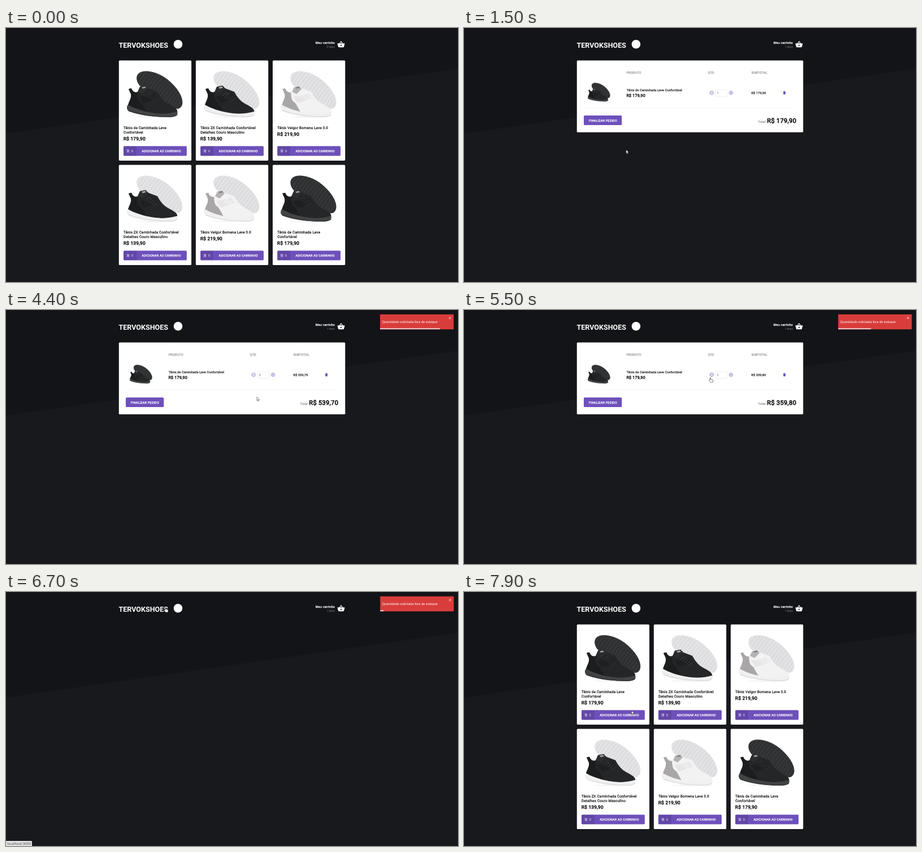
These frames come from a looping animation (800 by 450 pixels, 8 s). An HTML page:

```html
<!DOCTYPE html>
<html lang="pt-BR">
<head>
<meta charset="utf-8">
<title>Loja</title>
<style>
html, body { margin: 0; width: 100%; height: 100%; overflow: hidden; background: #18191d; }
svg { display: block; width: 100vw; height: 100vh; }
text { font-family: Roboto, sans-serif; text-rendering: geometricPrecision; white-space: pre; }
.strong { letter-spacing: .033em; stroke-width: .05em; }
.toast { font-family: "Liberation Sans", Arial, sans-serif; }
.tip { font-family: "Noto Sans", sans-serif; }
</style>
</head>
<body>
<svg id="stage" viewBox="0 0 800 450" preserveAspectRatio="none"></svg>
<script>
const LOOP = 8000;
const PURPLE = '#6e50bb', DARK_PURPLE = '#5f43a6';
const stage = document.getElementById('stage');
const $ = id => document.getElementById(id);

const icons = {
  basket: 'M17.21 9l-4.38-6.56c-.19-.28-.51-.42-.83-.42-.32 0-.64.14-.83.43L6.79 9H2c-.55 0-1 .45-1 1 0 .09.01.18.04.27l2.54 9.27c.23.84 1 1.46 1.92 1.46h13c.92 0 1.69-.62 1.93-1.46l2.54-9.27L23 10c0-.55-.45-1-1-1h-4.79zM9 9l3-4.4L15 9H9zm3 8c-1.1 0-2-.9-2-2s.9-2 2-2 2 .9 2 2-.9 2-2 2z',
  cart: 'M11 9h2V6h3V4h-3V1h-2v3H8v2h3zM7 18a2 2 0 1 0 .01 0zM17 18a2 2 0 1 0 .01 0zM7.2 14.6L8.1 13h7.4c.8 0 1.4-.4 1.8-1l3.9-7-1.8-1-3.9 7h-7L4.3 2H1v2h2l3.6 7.6-1.35 2.4C4.5 15.4 5.5 17 7 17h12v-2H7.4z',
  trash: 'M6 19c0 1.1.9 2 2 2h8c1.1 0 2-.9 2-2V7H6v12zM19 4h-3.5l-1-1h-5l-1 1H5v2h14V4z'
};

function text(x, y, size, str, fill, o = {}) {
  const strong = o.plain ? '' : ` stroke="${fill}"`;
  const cls = o.cls || (o.plain ? '' : 'strong');
  return `<text x="${x}" y="${y}" font-size="${size}" fill="${fill}"${strong} class="${cls}"` +
    ` text-anchor="${o.anchor || 'start'}" font-weight="${o.weight || 400}"` +
    `${o.id ? ` id="${o.id}"` : ''}>${str}</text>`;
}
const rect = (x, y, w, h, fill, r = 0, more = '') =>
  `<rect x="${x}" y="${y}" width="${w}" height="${h}" rx="${r}" fill="${fill}" ${more}/>`;
const path = (d, fill, more = '') => `<path d="${d}" fill="${fill}" ${more}/>`;
const icon = (name, x, y, size, fill) =>
  path(icons[name], fill, `transform="translate(${x} ${y}) scale(${size / 24})"`);

// Shoe pair: tilted outsole behind, side view in front
const BACK = 'M232 92C230 81 238 76 251 77C271 79 289 91 302 108C309 117 314 129 311 137C308 145 299 144 290 139L256 114C244 110 234 102 232 92Z';
const UPPER = 'M217 108L222 107C224 113 229 115 233 113L237 104L247 102L252 107L268 113C273 122 278 129 287 134C294 138 301 141 303 146C304 150 302 152 299 153L266 154C246 152 230 147 216 140C215 133 223 125 221 117Z';
const HEEL = 'M217 108L222 107C224 113 229 115 232 114C233 123 232 128 240 133L249 149C236 147 226 144 216 140C215 133 223 125 221 117Z';
const SOLE = 'M216 136C226 142 242 148 264 151C279 153 292 151 303 148C306 154 299 158 288 158C262 158 238 155 218 148C213 145 213 139 216 136Z';

function shoe(c) {
  let ridges = '', laces = '';
  for (let i = 0; i < 19; i++) {
    const x = 229 + i * 4.6, y = 79 + i * 3.4;
    ridges += `M${x - 16} ${y + 22}q8 -7 14 -18t18 -22`;
  }
  for (let i = 0; i < 5; i++) laces += `M${246 + i * 4} ${121 + i * 2.3}l${9 - i * .5} -7`;
  return '<ellipse cx="266" cy="157.5" rx="36" ry="1.6" fill="#000" opacity=".04"/>' +
    path(BACK, c.back) +
    path(ridges, 'none', `stroke="${c.ridge}" stroke-width="1.2" clip-path="url(#outsole)"`) +
    path(BACK, 'none', `stroke="${c.rim}" stroke-width="1"`) +
    path(UPPER, c.upper) + path(HEEL, c.heel) +
    path('M234 113L238 105L247 103L251 108L242 117Z', c.tongue) +
    path('M240 105L246 103.5L248 106L242 107.5Z', c.label) +
    path('M236 122L262 116L270 125L244 133Z', c.band) +
    path(laces, 'none', `stroke="${c.lace}" stroke-width="1.2"`) +
    path(SOLE, c.sole) +
    path('M217 146C238 154 262 157 288 157C296 157 301 156 303 153', 'none', `stroke="${c.tread}" stroke-width="1.4"`);
}
const shoes = {
  black: { back: '#343537', ridge: '#292a2b', rim: '#303133', upper: '#252628', heel: '#1c1d1e', tongue: '#2c2d2f',
    label: '#999', band: '#1e1f20', lace: '#343537', sole: '#424345', tread: '#343537' },
  mixed: { back: '#e3e3e5', ridge: '#d6d6d8', rim: '#e6e6e8', upper: '#252628', heel: '#1c1d1e', tongue: '#2c2d2f',
    label: '#aaa', band: '#1e1f20', lace: '#3b3c3e', sole: '#f0f0f1', tread: '#dcdcde' },
  white: { back: '#e2e2e4', ridge: '#d5d5d7', rim: '#e4e4e6', upper: '#f2f2f3', heel: '#a9a6a7', tongue: '#b5b2b3',
    label: '#858384', band: '#e6e6e7', lace: '#f8f8f8', sole: '#f0f0f1', tread: '#dcdcde' }
};

const products = {
  black: { title: ['Tênis de Caminhada Leve', 'Confortável'], price: '179,90' },
  mixed: { title: ['Tênis ZK Caminhada Confortável', 'Detalhes Couro Masculino'], price: '139,90' },
  white: { title: ['Tênis Velgor Bomena Leve 3.0'], price: '219,90' }
};

function card(kind, i) {
  const p = products[kind], n = p.title.length;
  const dx = i % 3 * 136.1, dy = Math.floor(i / 3) * 185.1;
  return `<g transform="translate(${dx} ${dy})">` +
    rect(199.8, 57.5, 128.3, 177.4, '#fff', 1.6) +
    `<use href="#${kind}"/>` +
    p.title.map((s, k) => text(208.1, 178.5 + k * 8.2, 6.27, s, '#2b2b2b')).join('') +
    text(207.9, 190.8 + (n - 1) * 8.2, 8.24, 'R$ ' + p.price, '#000') +
    rect(208, 209.3, 111.9, 17.1, PURPLE, 1.6, `id="buy${i}"`) +
    path('M209.6 209.3H230.9V226.4H209.6Q208 226.4 208 224.8V210.9Q208 209.3 209.6 209.3Z', '#000', 'opacity=".1"') +
    icon('cart', 213, 214.8, 6.27, '#fff') +
    text(221.8, 220, 5.49, '0', '#fff', { plain: true, id: 'count' + i }) +
    text(275, 220, 5.49, 'ADICIONAR AO CARRINHO', '#fff', { anchor: 'middle' }) + '</g>';
}

const round = (id, x, plus) =>
  `<g id="${id}" fill="none" stroke="${PURPLE}" stroke-width=".7"><circle cx="${x}" cy="114.7" r="3.1"/>` +
  `<path d="M${x - 1.7} 114.7h3.4${plus ? `M${x} 113v3.4` : ''}"/></g>`;

const GREY = '#999';
stage.innerHTML =
  `<defs><clipPath id="outsole"><path d="${BACK}"/></clipPath>` +
  Object.keys(shoes).map(k => `<g id="${k}">${shoe(shoes[k])}</g>`).join('') + '</defs>' +
  rect(0, 0, 800, 450, '#18191d') + path('M0 0H800V72L0 187Z', '#131418') +
  text(199.5, 35.4, 12.55, 'TERVOKSHOES', '#fff', { plain: true, weight: 700 }) +
  '<circle cx="304.5" cy="28.8" r="7.8" fill="#fff"/>' +
  text(582.2, 27.9, 5.49, 'Meu carrinho', '#fff', { anchor: 'end' }) +
  text(582, 34.8, 4.8, '', '#888', { anchor: 'end', plain: true, id: 'items' }) +
  icon('basket', 586, 22, 14.1, '#fff') +
  '<g id="home">' + ['black', 'mixed', 'white', 'mixed', 'white', 'black'].map(card).join('') + '</g>' +
  '<g id="cart">' + rect(199.8, 57.5, 400.5, 127.3, '#fff', 1.6) +
  text(287.7, 81.4, 5.49, 'PRODUTO', GREY) + text(431.8, 81.4, 5.49, 'QTD', GREY) + text(508.8, 81.4, 5.49, 'SUBTOTAL', GREY) +
  '<use href="#black" transform="translate(132.5 66.3) scale(.404)"/>' +
  text(287.7, 111.5, 5.49, 'Tênis de Caminhada Leve Confortável', '#2b2b2b') +
  text(287.5, 122, 7.06, 'R$ 179,90', '#000') +
  round('minus', 438.3, false) + round('plus', 472.5, true) +
  rect(445.2, 109.2, 20.6, 12.2, '#fff', 1.6, 'stroke="#ddd" stroke-width=".5"') +
  text(447.8, 117.4, 5.49, '', '#666', { plain: true, id: 'qty' }) +
  text(508.6, 116.9, 5.49, '', '#2b2b2b', { id: 'sub' }) +
  icon('trash', 563.2, 110.6, 7.84, PURPLE) +
  rect(212, 141.4, 376, .5, '#eee') +
  rect(212, 155.1, 67.3, 17, PURPLE, 1.6) +
  text(245.8, 165.7, 5.49, 'FINALIZAR PEDIDO', '#fff', { anchor: 'middle' }) +
  text(520.6, 167.7, 5.49, 'Total', GREY) + text(588.2, 167.7, 10.98, '', '#000', { anchor: 'end', id: 'total' }) + '</g>' +
  '<g id="toast">' + rect(662.3, 7.8, 130.2, 26.4, '#d93d3b', .4) +
  text(665.8, 22.9, 5.83, 'Quantidade solicitada fora de estoque', '#fff', { cls: 'toast', plain: true }) +
  path('M784.2 12.5l3.4 3.4m0 -3.4l-3.4 3.4', 'none', 'stroke="#fff" stroke-width=".8"') +
  rect(662.3, 32.2, 0, 2, '#f3c9c8', 0, 'id="bar"') + '</g>' +
  '<g id="status">' + path('M0 441H44.5Q46 441 46 442.5V450H0Z', '#e4e4e5') +
  text(2, 447.7, 6.2, 'localhost:3000', '#444', { cls: 'tip', plain: true }) + '</g>' +
  path('M0 0V6.6L1.5 5.2L2.5 7.5L3.6 7L2.6 4.8H4.7Z', '#fff', 'id="arrow" stroke="#111" stroke-width=".5"') +
  path('M-.6 3.7V.4C-.6 -.4 .6 -.4 .6 .4V2.7L4.2 3.3Q5.3 3.6 5.1 4.9L4.5 7.7H.6L-1.5 4.9C-2 4 -1.2 3.3 -.6 3.7Z', '#fff', 'id="hand" stroke="#222" stroke-width=".6"');

// Pointer track: time, x, y
const track = [
  [100, 730, 249], [300, 610, 246], [500, 430, 232], [700, 321, 222], [900, 287, 215.8],
  [1800, 287, 215.8], [2100, 352, 190], [2300, 468, 142], [2400, 503, 128], [2600, 480, 115], [2700, 474, 113.3],
  [4000, 474, 113.3], [4200, 466, 135], [4400, 444, 154], [4600, 420, 145], [4900, 436, 122],
  [5500, 435.8, 120.3], [5800, 429, 126], [6100, 395, 105], [6400, 310, 48], [6600, 282, 28.2],
  [7200, 282, 28.2], [7400, 335, 62], [7600, 393, 120], [7800, 330, 184], [7900, 296.6, 210]
];
function pointer(t) {
  let i = 1;
  while (i < track.length - 1 && track[i][0] < t) i++;
  const [t0, x0, y0] = track[i - 1], [t1, x1, y1] = track[i];
  const k = Math.max(0, Math.min(1, (t - t0) / (t1 - t0)));
  return [x0 + (x1 - x0) * k, y0 + (y1 - y0) * k];
}

const TOAST_START = 3840, TOAST_LIFE = 3000;
function toastShift(age) {
  if (age > TOAST_LIFE) return -8 * Math.min(1, (age - TOAST_LIFE) / 140);
  const stops = [[0, 1176], [.6, -10], [.75, 4], [.9, -2], [1, 0]];
  const p = Math.min(1, age / 700);
  let i = 1;
  while (i < 4 && stops[i][0] < p) i++;
  const [a, from] = stops[i - 1], [b, to] = stops[i];
  return to + (from - to) * Math.pow(1 - (p - a) / (b - a), 3);
}

const within = (t, a, b) => t >= a && t < b;
const show = (id, on) => $(id).setAttribute('visibility', on ? 'visible' : 'hidden');
const money = n => 'R$ ' + n.toFixed(2).replace('.', ',');

function draw(now) {
  const t = Math.floor((now % LOOP + 1) / 100) * 100 % LOOP;
  show('home', t < 1500 || t >= 6800);
  show('cart', within(t, 1500, 6700));
  $('items').textContent = (t < 1500 ? 0 : 1) + ' itens';
  $('count0').textContent = t < 1500 ? 0 : 2;

  const qty = t < 3100 ? 1 : t < 3500 ? 2 : t < 5200 ? 3 : 2;
  $('qty').textContent = qty;
  $('sub').textContent = $('total').textContent = money(qty * 179.9);

  const onBuy = within(t, 800, 1500), onPlus = within(t, 2800, 4200);
  const onMinus = within(t, 4900, 5800), onLogo = within(t, 6500, 7400);
  $('buy0').setAttribute('fill', onBuy ? DARK_PURPLE : PURPLE);
  $('plus').setAttribute('stroke', onPlus ? DARK_PURPLE : PURPLE);
  $('minus').setAttribute('stroke', onMinus ? DARK_PURPLE : PURPLE);
  show('status', within(t, 6600, 7400));

  const age = t - TOAST_START;
  show('toast', within(t, 4100, 7100));
  $('toast').setAttribute('transform', `translate(${toastShift(Math.max(0, age))} 0)`);
  $('bar').setAttribute('width', 130.2 * Math.max(0, Math.min(1, 1 - age / TOAST_LIFE)));

  const [x, y] = pointer(t), hand = onBuy || onPlus || onMinus || onLogo;
  show('hand', hand);
  show('arrow', !hand && t >= 100);
  for (const id of ['hand', 'arrow']) $(id).setAttribute('transform', `translate(${x} ${y})`);
}

let start;
function tick(now) {
  if (start === undefined) start = now;
  draw(now - start);
  requestAnimationFrame(tick);
}
draw(0);
requestAnimationFrame(tick);
</script>
</body>
</html>
```
